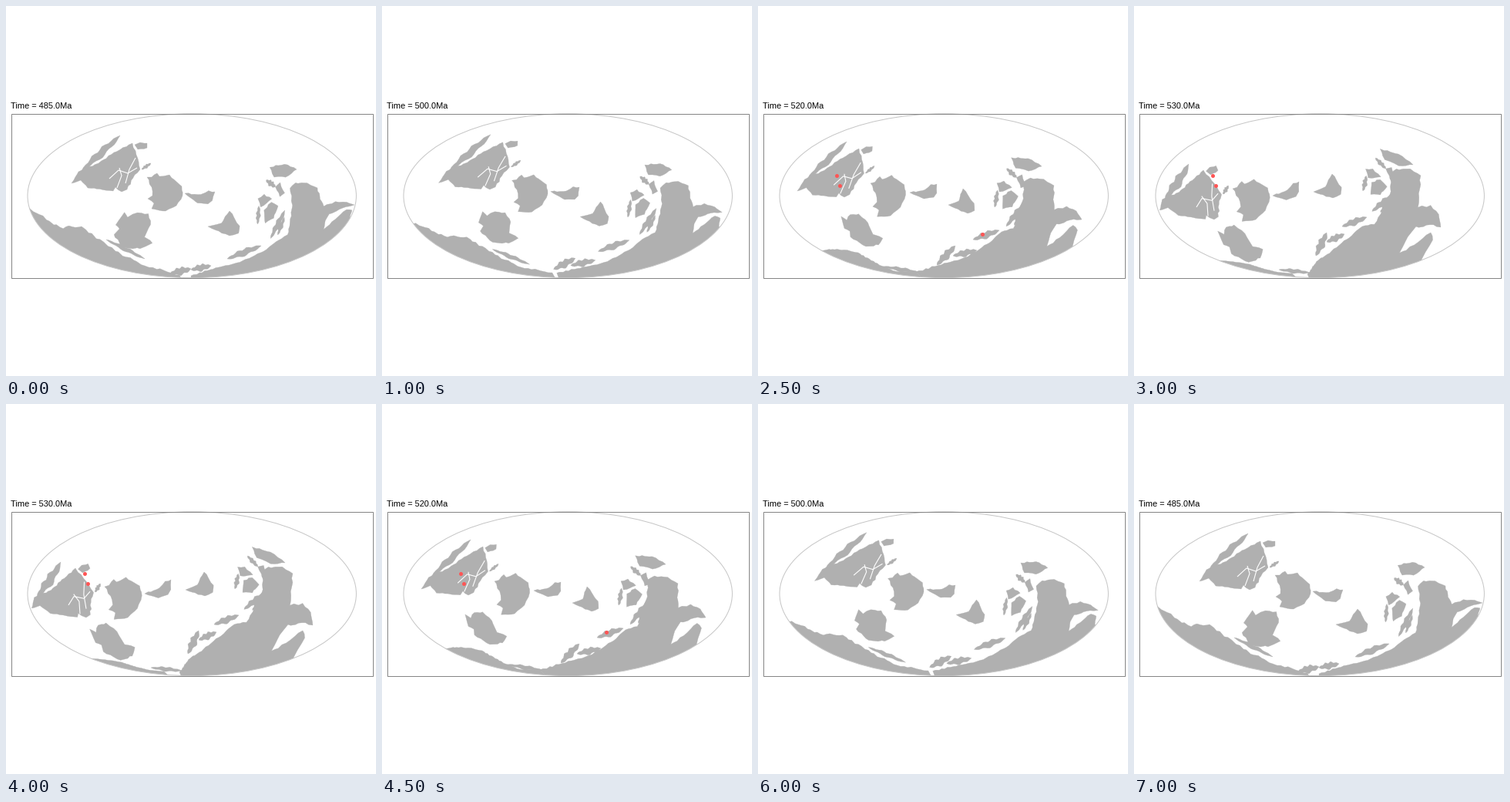
Animation of 480 by 480 pixels, one loop 7.5 s. Source, as a matplotlib script:

```python
import numpy as np
import matplotlib.pyplot as plt
from matplotlib.animation import FuncAnimation
from matplotlib.collections import LineCollection, PolyCollection
from matplotlib.patches import Ellipse, Rectangle

SIZE, DPI = 480, 100
PX = 72 / DPI
CENTRE, RX, RY = np.array([241.2, 246.2]), 213.2, 106.4
KEYS = [485, 510, 520, 530]
AGES = [485, 490, 500, 510, 515, 520, 530, 540]
LAND = "#b0b0b0"

rng = np.random.default_rng(4)


def coast(pts, closed=True):
    """Roughen an outline a little between its corners."""
    pts = np.array(pts, float)
    ends = np.roll(pts, -1, 0)
    out = []
    for p, q in list(zip(pts, ends))[:len(pts) - (not closed)]:
        n = max(1, int(np.hypot(*(q - p)) / 4))
        wobble = rng.uniform(-0.9, 0.9, (n, 2))
        wobble[0] = 0
        out.append(p + (q - p) * np.arange(n)[:, None] / n + wobble)
    return np.vstack(out + [pts[-1:]] * (not closed))


def lens(p, q, width):
    """A thin, slightly uneven sliver from p to q."""
    p, q = np.array(p, float), np.array(q, float)
    t = np.linspace(0, 1, 16)[:, None]
    d = q - p
    side = np.array([-d[1], d[0]]) / np.hypot(*d)
    half = width / 2 * np.sin(np.pi * t) ** 0.8
    a = p + d * t + side * half * (1 + 0.3 * np.sin(17 * t))
    b = p + d * t - side * half * (1 + 0.3 * np.sin(23 * t))
    return np.vstack([a, b[::-1]])


def spline(src, dst, pts):
    """Thin-plate warp that carries the points src onto dst."""
    def kernel(a, b):
        d = ((a[:, None] - b[None]) ** 2).sum(-1)
        return d * np.log(d + 1e-9)

    def affine(a):
        return np.c_[np.ones(len(a)), a]

    n = len(src)
    m = np.zeros((n + 3, n + 3))
    m[:n, :n] = kernel(src, src)
    m[:n, n:] = affine(src)
    m[n:, :n] = affine(src).T
    w = np.linalg.lstsq(m, np.vstack([dst, np.zeros((3, 2))]), rcond=None)[0]
    return kernel(pts, src) @ w[:n] + affine(pts) @ w[n:]


def wrap(pts):
    """The same outline seen past the opposite edge of the globe."""
    v = (pts[:, 1] - CENTRE[1]) / RY
    return np.c_[pts[:, 0] + 2 * RX * np.sqrt(np.clip(1 - v ** 2, 0, 1)),
                 pts[:, 1]]


def close_beyond(pts, corner):
    """Close a coast that runs off the globe, outside of its edge."""
    out = CENTRE + 1.25 * (pts[-1] - CENTRE)
    return np.vstack([pts, out, (corner, 380), (240, 380)])


def pose(pins, age):
    """Pin positions at an age; each pin is known at the key ages."""
    if age > KEYS[-1]:
        k = 0.7 * (age - KEYS[-1]) / 10
        return pins[-1] + k * (pins[-1] - pins[-2])
    return np.array([[np.interp(age, KEYS, pins[:, i, j]) for j in (0, 1)]
                     for i in range(pins.shape[1])])


class Plate:
    def __init__(self, ref, pins, shapes=(), cracks=(), corner=None,
                 wraps=False):
        self.pins = np.array(pins, float).transpose(1, 0, 2)
        self.src = self.pins[KEYS.index(ref)]
        self.shapes = list(shapes) or [coast(self.src, False)]
        self.cracks = [np.array(c, float) for c in cracks]
        self.corner, self.wraps = corner, wraps

    def at(self, age):
        dst = pose(self.pins, age)
        land = [spline(self.src, dst, s) for s in self.shapes]
        gaps = [spline(self.src, dst, c) for c in self.cracks]
        if self.corner:
            land = [close_beyond(s, self.corner) for s in land]
        if self.wraps:
            land += [wrap(s) for s in land]
        return land, gaps


class Strip:
    def __init__(self, width, *ends):
        self.width = width
        self.ends = np.array(ends, float).transpose(1, 0, 2)

    def at(self, age):
        return [lens(*pose(self.ends, age), self.width)], []


northwest = Plate(485, [
    [(86, 229), (67, 228), (52, 239), (34, 264)],
    [(164, 178), (152, 176), (131, 185), (90, 213)],
    [(150, 241), (133, 236), (112, 248), (104, 277)],
    [(148, 168), (136, 166), (115, 176), (71, 205)],
    [(184, 182), (172, 177), (149, 186), (109, 211)],
], [
    coast([(85, 230), (94, 215), (103, 210), (120, 204), (140, 190),
           (164, 178), (169, 193), (174, 212), (167, 219), (157, 238),
           (150, 241), (142, 235), (139, 240), (106, 236), (97, 226)]),
    lens((98, 214), (148, 168), 9),
    coast([(167, 180), (174, 177), (183, 178), (183, 184), (171, 186)]),
    lens((176, 212), (188, 204), 4),
], [
    [(134, 224), (146, 213), (158, 217), (170, 210)],
    [(144, 236), (150, 220), (147, 210)],
    [(155, 230), (160, 212), (168, 197)],
], wraps=True)

block = Plate(485, [
    [(183, 222), (159, 229), (146, 230), (128, 237)],
    [(207, 266), (186, 268), (172, 272), (158, 277)],
    [(229, 238), (205, 234), (191, 236), (175, 240)],
], [
    coast([(183, 222), (189, 222), (196, 217), (199, 221), (212, 219),
           (228, 234), (229, 246), (221, 259), (207, 266), (189, 263),
           (192, 256), (184, 250), (190, 246), (189, 235)]),
])

sliver = Plate(510, [
    [(232, 243), (210, 239), (197, 242), (180, 246)],
    [(271, 241), (246, 231), (232, 231), (214, 228)],
    [(263, 257), (243, 247), (229, 248), (211, 247)],
], [
    coast([(210, 239), (230, 237), (238, 231), (246, 231), (246, 242),
           (242, 247), (229, 248)]),
])

wedge = Plate(510, [
    [(262, 286), (254, 265), (247, 258), (233, 241)],
    [(290, 266), (279, 246), (266, 237), (257, 218)],
    [(290, 298), (276, 277), (272, 269), (258, 249)],
], [
    coast([(254, 265), (269, 261), (279, 246), (288, 265), (286, 274),
           (276, 277), (265, 271)]),
])

southwest = Plate(510, [
    [(154, 269), (116, 267), (109, 274), (110, 293)],
    [(188, 281), (152, 276), (141, 279), (142, 293)],
    [(186, 310), (166, 299), (161, 304), (167, 319)],
], [
    coast([(115, 266), (122, 271), (130, 266), (143, 267), (153, 278),
           (155, 291), (168, 297), (158, 303), (138, 302), (119, 289),
           (121, 283), (114, 279)]),
])

south = Plate(510, [
    [(225, 349), (218, 344), (205, 345), (205, 347)],
    [(180, 337), (180, 340), (178, 344), (185, 345)],
    [(142, 318), (150, 326), (152, 333), (165, 340)],
    [(98, 286), (118, 309), (130, 320), (150, 335)],
    [(70, 287), (88, 306), (105, 316), (130, 332)],
    [(30, 262), (53, 295), (82, 317), (110, 330)],
], corner=80)

east = Plate(510, [
    [(372, 232), (360, 232), (349, 225), (336, 214)],
    [(404, 236), (393, 231), (384, 233), (372, 220)],
    [(452, 258), (434, 274), (420, 277), (398, 287)],
    [(371, 262), (357, 258), (343, 253), (332, 244)],
    [(350, 306), (330, 300), (316, 293), (296, 286)],
    [(280, 338), (262, 337), (250, 332), (240, 329)],
    [(240, 350), (218, 344), (205, 345), (225, 348)],
    [(446, 275), (431, 294), (408, 312), (373, 329)],
], [
    coast([(218, 344), (262, 337), (285, 331), (314, 314), (330, 300),
           (347, 292), (355, 268), (358, 255), (356, 236), (364, 229),
           (380, 226), (393, 231), (396, 252), (398, 261), (412, 258),
           (425, 265), (434, 274), (420, 273), (404, 276), (399, 285),
           (397, 298), (412, 288), (425, 278), (432, 282), (431, 294)],
          closed=False),
], corner=400)

archipelago = Plate(510, [
    [(347, 208), (345, 204), (334, 197), (325, 187)],
    [(377, 212), (375, 213), (368, 208), (362, 206)],
    [(326, 280), (314, 265), (307, 258), (297, 237)],
    [(345, 300), (330, 292), (324, 285), (311, 266)],
], [
    coast([(340, 204), (360, 204), (375, 213), (359, 220), (344, 217)]),
    coast([(344, 229), (351, 225), (355, 239), (348, 242)]),
    coast([(319, 237), (328, 234), (337, 242), (321, 248)]),
    coast([(324, 270), (325, 253), (336, 246), (344, 253), (336, 267)]),
    lens((314, 268), (319, 246), 5),
    lens((333, 218), (344, 229), 6),
    lens((328, 293), (352, 261), 7),
    lens((338, 291), (350, 270), 5),
])

strips = [
    Strip(5, [(130, 303), (152, 324), (163, 338), (188, 342)],
          [(180, 328), (199, 340), (210, 346), (228, 346)]),
    Strip(9, [(213, 347), (229, 338), (232, 336), (236, 324)],
          [(240, 341), (258, 318), (256, 311), (250, 294)]),
    Strip(8, [(240, 342), (248, 333), (253, 324), (250, 306)],
          [(266, 337), (284, 325), (284, 317), (273, 296)]),
    Strip(8, [(287, 328), (276, 312), (279, 303), (270, 286)],
          [(331, 311), (314, 299), (313, 291), (302, 274)]),
]

PLATES = [northwest, block, sliver, wedge, southwest, south, east,
          archipelago] + strips

PAIR = [(102, 220), (105.5, 233)]
SITES = {
    510: PAIR + [(98.5, 232), (175.5, 248.5), (178, 249), (279.5, 258.5),
                 (221, 344), (223, 344.5), (229, 344), (252, 345.5)],
    515: PAIR,
    520: PAIR + [(290.5, 295.5)],
    530: PAIR,
}


def build(age):
    land, gaps = [], []
    for plate in PLATES:
        shapes, cracks = plate.at(age)
        land += shapes
        gaps += cracks
    return land, gaps


MAPS = {age: build(age) for age in AGES}

fig = plt.figure(figsize=(SIZE / DPI, SIZE / DPI), dpi=DPI, facecolor="white")
ax = fig.add_axes([0, 0, 1, 1])
ax.set(xlim=(0, SIZE), ylim=(SIZE, 0))
ax.axis("off")

globe = Ellipse(CENTRE, 2 * RX, 2 * RY, fc="none", ec="#c6c6c6", lw=PX,
                zorder=3)
ax.add_patch(globe)
ax.add_patch(Rectangle((7, 140), 468.5, 212.5, fc="none", ec="#858585",
                       lw=PX, zorder=4))

land = ax.add_collection(PolyCollection([], fc=LAND, ec=LAND, lw=0.3 * PX))
gaps = ax.add_collection(LineCollection([], colors="white", lw=1.1 * PX,
                                        zorder=2))
for art in (land, gaps):
    art.set_clip_path(globe)

dots, = ax.plot([], [], "o", ms=5 * PX, mfc="#ff5555", mec="none", zorder=5)
label = ax.text(6.5, 133, "", fontsize=11 * PX, family="Liberation Sans",
                color="black", va="baseline")


def update(i):
    age = AGES[7 - abs(7 - i)]
    shapes, cracks = MAPS[age]
    land.set_verts(shapes)
    gaps.set_segments(cracks)
    sites = np.array(SITES.get(age, []), float).reshape(-1, 2)
    dots.set_data(sites[:, 0], sites[:, 1])
    label.set_text(f"Time = {age:.1f}Ma")
    return land, gaps, dots, label


anim = FuncAnimation(fig, update, frames=15, interval=500, repeat=True)
plt.show()
```
